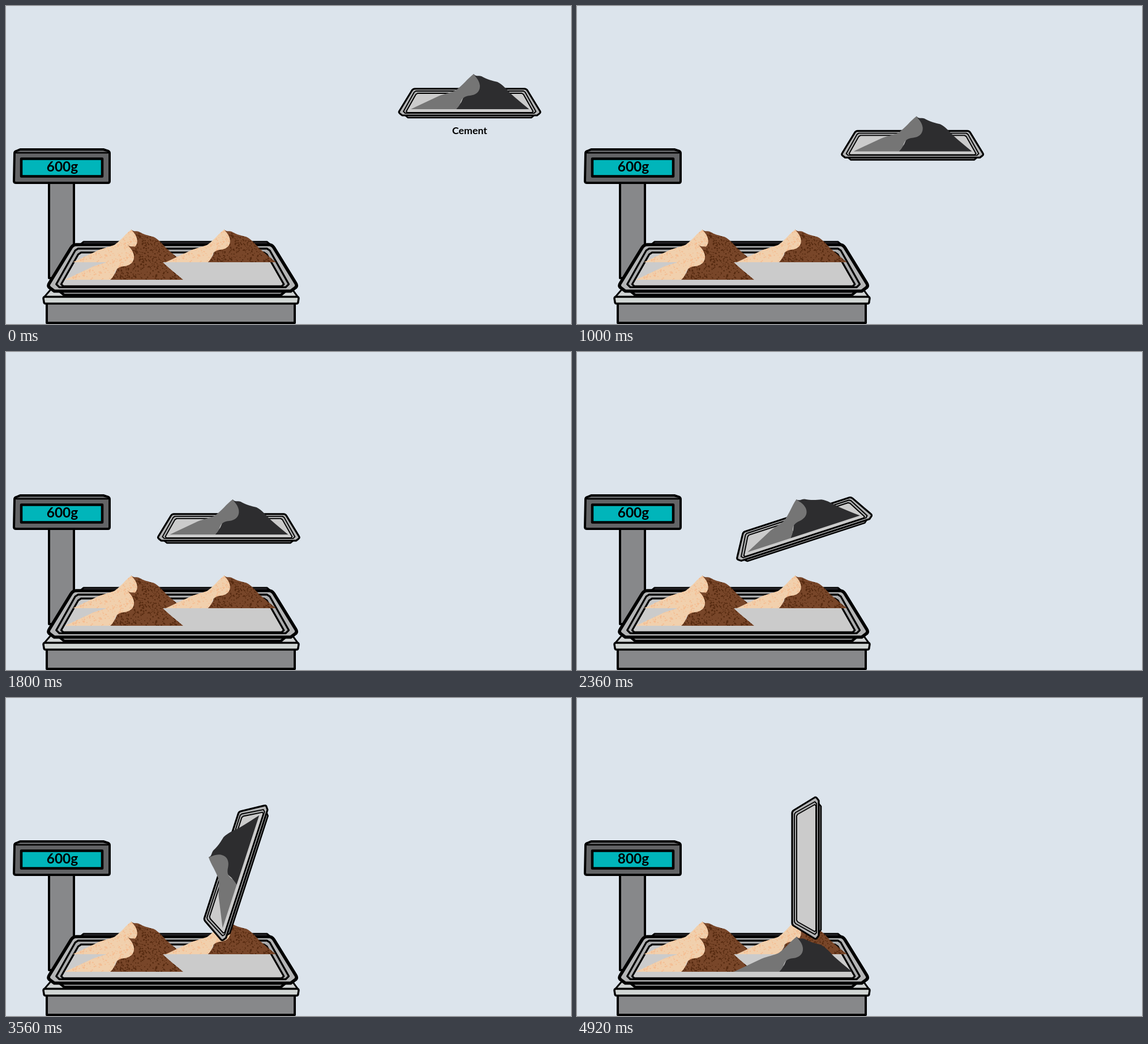
An HTML page for the animation above (5.46 s loop, 998 by 561 pixels).

```html
<!DOCTYPE html>
<html lang="en">
<head>
<meta charset="utf-8">
<title>Weighing cement</title>
<style>
  html, body { margin: 0; width: 100%; height: 100%; overflow: hidden; background: #dce4ec; }
  svg { display: block; width: 100%; height: 100%; }
  text { font-family: Carlito, Lato, sans-serif; font-weight: 700; text-anchor: middle; }
  .ink { stroke: #000; stroke-linejoin: round; stroke-linecap: round; }
</style>
</head>
<body>
<svg viewBox="0 0 998 561">
  <defs>
    <!-- Heaps have their origin on the base line, below the peak -->
    <path id="shade" d="M0-62C4-57 8-60 14-58C24-52 34-50 42-48C52-43 58-35 66-27C76-18 87-9 98 0H-31L-22-12Z"/>
    <path id="lit" d="M-111 0L-62-23C-50-28-40-29-32-33C-19-42-11-54 0-62C2-58 10-52 11-42C12-31 4-25-6-24C-18-23-21-18-23-12C-25-6-28-3-31 0Z"/>
    <clipPath id="shadeClip"><use href="#shade"/></clipPath>
    <clipPath id="litClip"><use href="#lit"/></clipPath>
    <g id="cement">
      <use href="#shade" fill="#2d2d2f"/>
      <use href="#lit" fill="#757575"/>
    </g>
    <g id="sand">
      <use href="#shade" fill="#784629"/>
      <path id="darkDots" clip-path="url(#shadeClip)" fill="#54290f"/>
      <use href="#lit" fill="#f1d0ad"/>
      <path id="lightDots" clip-path="url(#litClip)" fill="#f4bd92"/>
    </g>
    <g id="tray" class="ink">
      <path d="M704 192L710 197H928L934 192Z" fill="#98999a" stroke-width="2.6"/>
      <path d="M722 146H916Q919 146 921 149L943 185Q945 188 942 190L938 193H700L696 190Q693 188 695 185L717 149Q719 146 722 146Z" fill="#b4b5b6" stroke-width="3.2"/>
      <path d="M724 150H914L917 152L936 186L933 189H705L702 186L721 152Z" fill="#aaabac" stroke-width="1.9"/>
      <path d="M727 154H911L914 156L931 186L929 188H709L707 186L724 156Z" fill="#cbcbcb" stroke-width="1.9"/>
    </g>
  </defs>

  <rect width="998" height="561" fill="#dce4ec"/>

  <g class="ink" stroke-width="4">
    <path d="M76 310H120V480H76Z" fill="#87888a"/>
    <path d="M15 260Q15 257 18 256L25 253H172L181 256Q183 257 183 260V309Q183 312 180 312H18Q14 312 14 309Z" fill="#636466"/>
    <path d="M18 259H180" stroke-width="2.5"/>
    <path d="M27 269.500H170V300.500H27Z" fill="#00b5ba" stroke-width="4.500"/>
    <path d="M130 422L137 416H461L468 422Z" fill="#76707f" stroke-width="3"/>
    <path d="M72 524H510V559H72Z" fill="#87888a"/>
    <path d="M67 514L80 499H505L516 514Z" fill="#cfd2d2" stroke-width="3"/>
    <path d="M69 513H514Q517 513 517 516L516 522Q516 525 513 525H70Q67 525 67 522L66 516Q66 513 69 513Z" fill="#d0d5d3" stroke-width="3.500"/>
  </g>
  <text id="before" x="99.500" y="292" font-size="24.500">600g</text>
  <text id="after" x="99.500" y="292" font-size="24.500">800g</text>

  <use href="#tray" transform="translate(295 421) scale(1.755 1.745) translate(-819.500 -146)"/>
  <use href="#sand" transform="translate(221.500 452) scale(.93)"/>
  <use href="#sand" transform="translate(385.500 452) scale(.93)"/>
  <use href="#sand" transform="translate(215 483)"/>

  <text id="label" x="819" y="225.500" font-size="17.800">Cement</text>
  <g id="load">
    <use href="#tray"/>
    <use id="heap" href="#cement" x="826" y="182"/>
  </g>
  <use id="poured" href="#cement" x="388" y="483"/>
</svg>
<script>
  const LOOP = 5460, STEP = 40;
  const el = id => document.getElementById(id);
  const progress = (t, start, length) => Math.min(1, Math.max(0, (t - start) / length));
  const ease = u => u < 0.5 ? 2 * u * u : 1 - 2 * (1 - u) * (1 - u);

  let seed = 17;
  const random = () => (seed = seed * 16807 % 2147483647) / 2147483647;

  function dots(left, width, count, size) {
    let d = '';
    for (let i = 0; i < count; i++) {
      const x = left + random() * width, y = -random() * 62;
      const r = size * (0.5 + random() * 0.6);
      d += `M${x.toFixed(1)} ${y.toFixed(1)}l${r.toFixed(1)} ${(-r).toFixed(1)} ${r.toFixed(1)} ${(r * 0.8).toFixed(1)} ${(-r * 0.7).toFixed(1)} ${r.toFixed(1)}z`;
    }
    return d;
  }
  el('darkDots').setAttribute('d', dots(-30, 130, 480, 1.7));
  el('lightDots').setAttribute('d', dots(-111, 122, 380, 1.7));

  const [label, load, heap, poured, before, after] =
    ['label', 'load', 'heap', 'poured', 'before', 'after'].map(el);

  function draw(t) {
    const move = ease(progress(t, 110, 1725));
    const turn = -90 * progress(t, 1960, 2000);
    const filled = progress(t, 4490, 420);
    load.setAttribute('transform',
      `translate(${-426 * move} ${140 * move}) rotate(${turn} 819.5 159.5)`);
    label.setAttribute('opacity', t < STEP ? 1 : 0);
    heap.setAttribute('opacity', 1 - progress(t, 4035, 490));
    poured.setAttribute('opacity', filled);
    before.setAttribute('opacity', 1 - filled);
    after.setAttribute('opacity', filled);
  }

  const begin = performance.now();
  function tick() {
    const t = (performance.now() - begin) % LOOP;
    draw(Math.floor(t / STEP) * STEP);
    requestAnimationFrame(tick);
  }
  tick();
</script>
</body>
</html>
```
